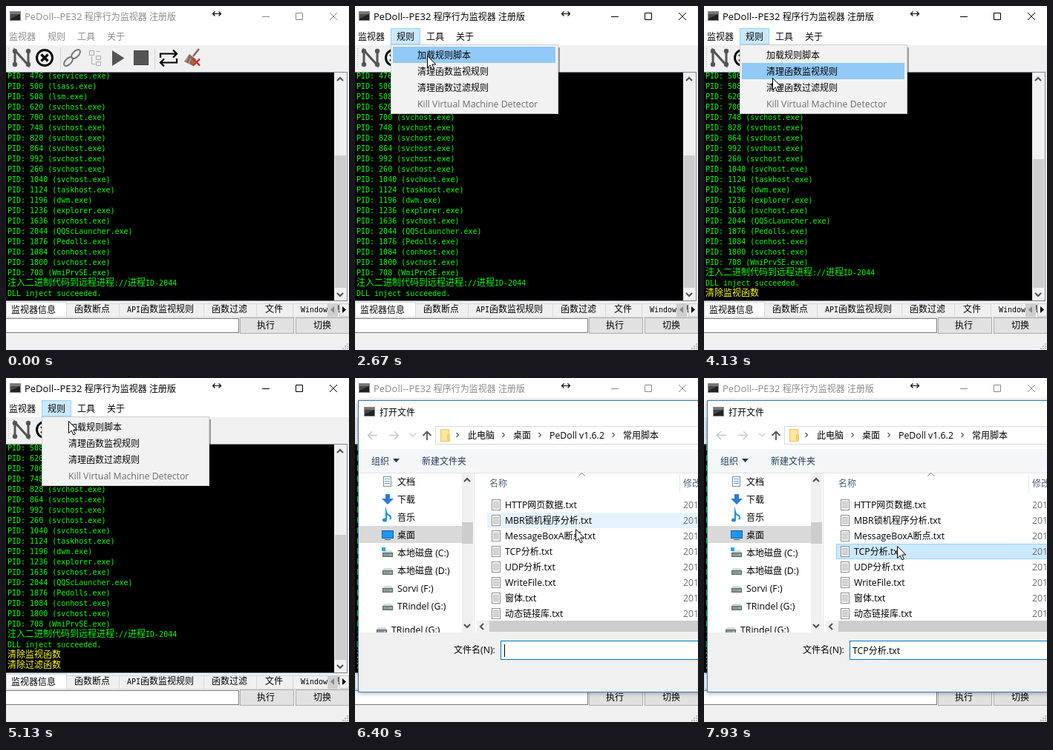
Animation of 462x465 px, one loop 8 s. Source, as an HTML page with a canvas:

```html
<!DOCTYPE html>
<html lang="zh">
<head>
<meta charset="utf-8">
<style>
html, body { margin: 0; width: 100%; height: 100%; overflow: hidden; background: #f0f0f0; }
canvas { display: block; }
</style>
</head>
<body>
<canvas id="stage" width="462" height="465"></canvas>
<script>
const view = document.getElementById('stage').getContext('2d');
const layer = Object.assign(document.createElement('canvas'), { width: 500, height: 465 }).getContext('2d');
let ctx = view;
const LOOP = 8000;
const CJK = '12px "Noto Sans CJK SC", "Noto Sans CJK", sans-serif';
const UI = '12.3px "Open Sans", "Noto Sans", sans-serif';
const TITLE = '13px "Open Sans", "Noto Sans", sans-serif';
const MONO = '10px "DejaVu Sans Mono", monospace';

// ---- timeline ----
const pointer = [
  [330, 347, 304], [1130, 68, 36], [1400, 68, 36], [1530, 72, 42], [1670, 72, 42],
  [1735, 89, 57], [1870, 89, 57], [2000, 97, 61], [2600, 97, 61], [2670, 97, 67],
  [2800, 96, 95], [3200, 96, 95], [3600, 70, 36], [3850, 70, 40], [4000, 87, 80],
  [4130, 92, 97], [4330, 94, 117], [4530, 94, 117], [4800, 68, 38], [5000, 72, 42],
  [5130, 84, 58], [5270, 90, 62], [5530, 90, 62], [5870, 114, 95], [6400, 297, 204],
  [6600, 290, 172], [6700, 290, 172], [6850, 280, 190], [7130, 270, 212],
  [7400, 270, 212], [7500, 266, 254], [7800, 266, 254], [7930, 260, 227]
];
const menuTimes = [[1400, 3200], [3800, 4530], [4930, 5530]];
const hoverTimes = [[1000, 1400], [3550, 3800], [4750, 4930]];
const itemSteps = [[1670, 0], [2735, 1], [3200, -1], [3930, 1], [4200, 2], [4530, -1], [5200, 0], [5530, -1]];
const pickSteps = [[6660, 0], [6860, 1], [7130, 2], [7470, 4], [7870, 3]];

const within = (spans, t) => spans.find(([a, b]) => t >= a && t < b);
const stepAt = (steps, t) => steps.reduce((v, [at, n]) => t >= at ? n : v, -1);
const clamp = v => Math.min(1, Math.max(0, v));

function pointerAt(t) {
  const i = pointer.findIndex(p => p[0] > t);
  if (i < 1) return i ? pointer[pointer.length - 1].slice(1) : null;
  const [a, x, y] = pointer[i - 1], [b, X, Y] = pointer[i];
  const k = (t - a) / (b - a);
  return [x + (X - x) * k, y + (Y - y) * k];
}

// ---- content ----
const processes = ('476 services,500 lsass,508 lsm,620 svchost,700 svchost,748 svchost,828 svchost,' +
  '864 svchost,992 svchost,260 svchost,1040 svchost,1124 taskhost,1196 dwm,1236 explorer,' +
  '1636 svchost,2044 QQScLauncher,1876 Pedolls,1084 conhost,1800 svchost,708 WmiPrvSE')
  .split(',').map(p => 'PID: ' + p.replace(' ', ' (') + '.exe)');
const log = [...processes, '注入二进制代码到远程进程://进程ID-2044', 'DLL inject succeeded.', '清除监视函数', '清除过滤函数'];
const menuItems = ['加载规则脚本', '清理函数监视规则', '清理函数过滤规则', 'Kill Virtual Machine Detector'];
const files = ['HTTP网页数据', 'MBR锁机程序分析', 'MessageBoxA断点', 'TCP分析', 'UDP分析', 'WriteFile', '窗体', '动态链接库']
  .map(n => n + '.txt');
const places = ['文档', '下载', '音乐', '桌面', '本地磁盘 (C:)', '本地磁盘 (D:)', 'Sorvi (F:)', 'TRindel (G:)'];

// ---- drawing helpers ----
function box(x, y, w, h, fill, edge) {
  ctx.fillStyle = edge || fill;
  ctx.fillRect(x, y, w, h);
  if (edge) {
    ctx.fillStyle = fill;
    ctx.fillRect(x + 1, y + 1, w - 2, h - 2);
  }
}
function fill(d, color) {
  ctx.fillStyle = color;
  ctx.fill(new Path2D(d));
}
function stroke(d, color, width = 1) {
  ctx.strokeStyle = color;
  ctx.lineWidth = width;
  ctx.stroke(new Path2D(d));
}
function oval(x, y, rx, ry, turn, color, width) {
  ctx.beginPath();
  ctx.ellipse(x, y, rx, ry, turn, 0, 7);
  ctx.strokeStyle = ctx.fillStyle = color;
  ctx.lineWidth = width;
  width ? ctx.stroke() : ctx.fill();
}
// Chinese and Latin runs have their own fonts.
function text(s, x, cy, color = '#000', latin = UI) {
  const base = cy + (latin === MONO ? 4 : 5);
  for (const run of s.match(/[\u2e80-\uffff]+|[^\u2e80-\uffff]+/g)) {
    ctx.font = run[0] > '\u2e80' ? CJK : latin;
    ctx.fillStyle = color;
    ctx.fillText(run, x, base);
    x += ctx.measureText(run).width;
  }
}
function chevron(x, y, dir, color = '#505050', width = 2) {
  const d = { up: 'm-4 2l4-4l4 4', down: 'm-4-2l4 4l4-4', left: 'm2-4l-4 4l4 4', right: 'm-1.5-3l3 3l-3 3' }[dir];
  stroke(`M${x} ${y}${d}`, color, width);
}
function consoleIcon(x, y) {
  box(x, y, 15, 13, '#222', '#888');
  box(x + 1, y + 1, 13, 3, '#777');
  fill(`M${x + 1} ${y + 4}h13l-13 6z`, '#484848');
}

// ---- main window ----
function toolbar() {
  box(0, 53, 462, 36, '#f0f0f0');
  for (const x of [73, 200]) box(x, 56, 1, 29, '#d4d4d4');
  for (let y = 57; y < 84; y += 3) box(3, y, 1, 1, '#aaa');
  stroke('M12 80V60L30 80V60', '#555', 3);
  for (const x of [12, 30]) for (const y of [61, 79]) oval(x, y, 3.2, 3.2, 0, '#555');
  oval(52, 70, 10.5, 10.5, 0, '#000', 2.8);
  stroke('M47.5 65.5l9 9m0-9l-9 9', '#000', 3.2);
  oval(94, 65, 7.5, 4, -.8, '#777', 2);
  oval(84, 75, 7.5, 4, -.8, '#777', 2);
  stroke('M112.5 60.5h6v6h-6zM121.5 61.5h5M115.5 68v10.500h5M121.5 67.5h6v5h-6zM121.5 75.5h6v5h-6z', '#aaa');
  fill('M143 60L159.500 70.500L143 81Z', '#555');
  box(172, 60, 20, 20, '#555', '#444');
  stroke('M208 70V64.500H230M225 59.500l5 5l-5 5M230 71v5.500H208M213 71.500l-5 5l5 5', '#000', 2.2);
  stroke('M260 58L252 68', '#7d6658', 2.5);
  fill('M247 65l9 7l-4 9l-12-6z', '#8c6b58');
  stroke('M245 69l-3 6m7-4l-3 7', '#c9b3a5');
  stroke('M252 71.500l9 9m0-9l-9 9', '#d8281c', 2.4);
}

function terminal(added) {
  box(0, 89, 460, 310, '#828790');
  box(0, 90, 442, 308, '#000');
  ctx.save();
  ctx.beginPath();
  ctx.rect(0, 90, 442, 308);
  ctx.clip();
  for (let i = 0; i < 22; i++) {
    const n = i + added;
    text(log[n], 2, 94 + 14 * i, n > 21 ? '#ff0' : '#0f0', MONO);
  }
  ctx.restore();
  box(442, 90, 17, 308, '#f0f0f0');
  const top = 202 + 5 * added;
  box(443, top, 15, 381 - top, '#cdcdcd');
  chevron(450, 99, 'up');
  chevron(450, 390, 'down');
}

function footer() {
  const edges = [81, 152, 266, 337, 386, 470];
  const names = [[92, '函数断点'], [163, 'API函数监视规则'], [277, '函数过滤'], [349, '文件'], [397, 'Window消息']];
  names.forEach(([x, name], i) => {
    box(edges[i], 402, edges[i + 1] - edges[i] + 1, 19, '#f0f0f0', '#d9d9d9');
    text(name, x, 410, '#000', MONO);
  });
  box(0, 400, 82, 21, '#fff', '#d9d9d9');
  text('监视器信息', 7, 411, '#000', MONO);
  box(433, 402, 14, 18, '#cfcfcf');
  box(449, 402, 13, 18, '#f0f0f0', '#d0d0d0');
  fill('M442 406v9l-5-4.500z', '#888');
  fill('M453 406v9l5-4.500z', '#000');
  box(-1, 422, 315, 20, '#fff', '#7a7a7a');
  box(315, 421, 73, 22, '#e1e1e1', '#adadad');
  box(390, 421, 73, 22, '#e1e1e1', '#adadad');
  text('执行', 338, 432, '#000', MONO);
  text('切换', 414, 432, '#000', MONO);
  for (let i = 0; i < 3; i++)
    for (let j = 0; j <= i; j++) box(459 - 3 * j, 456 + 3 * i, 2, 2, '#bbb');
}

function mainWindow(t) {
  const ink = t >= 1370 && t < 5700 ? '#000' : '#8a8a8a';
  const added = (t >= 3260) + (t >= 4600);
  const open = within(menuTimes, t);
  box(0, 0, 462, 465, '#f0f0f0');
  box(0, 0, 462, 53, '#fff');
  consoleIcon(5, 7);
  text('PeDoll--PE32 程序行为监视器 注册版', 25, 14, ink, TITLE);
  stroke('M279 10.5h10M281.500 7.500l-3 3l3 3M286.500 7.500l3 3l-3 3', '#000', 1.2);
  stroke('M345 14.5h10M390.500 9.500h9v9h-9zM436 9l10 10m0-10l-10 10', ink);
  if (open) box(48, 30, 40, 22, '#cce8ff', '#99d1ff');
  else if (within(hoverTimes, t)) box(48, 30, 40, 22, '#e5f3ff', '#cce8ff');
  [[4, '监视器'], [56, '规则'], [96, '工具'], [136, '关于']].forEach(([x, s]) => text(s, x, 41, ink));
  toolbar();
  terminal(added);
  footer();
  if (open) menu(clamp((t - open[0]) / 120), stepAt(itemSteps, t));
}

function menu(alpha, active) {
  ctx.save();
  ctx.globalAlpha = alpha;
  box(52, 56, 224, 92, 'rgba(0,0,0,.35)');
  box(48, 52, 226, 94, '#f2f2f2', '#ccc');
  if (active >= 0) box(51, 55 + 22 * active, 219, 22, '#91c9f7');
  menuItems.forEach((s, i) => text(s, 84, 66 + 22 * i, i < 3 ? '#000' : '#6d6d6d'));
  ctx.restore();
}

// ---- file dialog ----
function sheet() {
  ctx.save();
  ctx.shadowColor = 'rgba(0,0,0,.35)';
  ctx.shadowBlur = 6;
  ctx.shadowOffsetY = 1;
  box(4, 30, 860, 395, '#3a7cc4');
  ctx.restore();
  box(5, 31, 860, 393, '#fff');
  consoleIcon(12, 39);
  text('打开文件', 33, 46);
}

function blankPanes() {
  box(144, 129, 15, 214, '#dcdcdc');
  box(144, 195, 15, 29, '#969696');
  chevron(151, 138, 'up', '#000');
  chevron(151, 335, 'down', '#000');
  box(181, 327, 600, 25, '#cdcdcd');
  box(181, 327, 600, 15, '#9b9b9b');
  box(135, 359, 56, 21, '#e1e1e1');
}

function placeIcon(i, x, y) {
  if (i === 0) {
    box(x + 2, y - 7, 11, 14, '#fff', '#7d8a96');
    stroke(`M${x + 4} ${y - 3.5}h7m-7 3h7m-7 3h7`, '#5b9bd5');
  } else if (i === 1) fill(`M${x + 5} ${y - 7}h6v6h5l-8 8l-8-8h5z`, '#2b7cd3');
  else if (i === 2) {
    stroke(`M${x + 6} ${y + 4}v-11q1 4 5 5q2 3 0 5`, '#1e90e0', 2);
    oval(x + 4, y + 4, 3, 2.5, 0, '#1e90e0');
  } else if (i === 3) {
    box(x, y - 6, 16, 11, '#1e96f0', '#0b5ea8');
    box(x + 4, y + 6, 8, 1, '#456');
  } else {
    box(x + 1, y, 14, 6, '#8d9499', '#5d6468');
    fill(`M${x + 3} ${y - 3}h10l2 3h-14z`, '#d5d9dc');
    box(x + 11, y + 2, 2, 2, '#6f6');
    if (i === 4) box(x, y - 7, 5, 5, '#28a8ea');
  }
}

function navigation() {
  const pale = '#c8c8c8';
  stroke('M30 77.500H18M23 72l-5.500 5.500l5.500 5.500M46 77.500H58M53 72l5.500 5.500l-5.500 5.500', pale, 1.5);
  chevron(78, 77, 'down', pale, 1.2);
  stroke('M97 84V73M91.500 78l5.500-5.500l5.500 5.500', '#555', 1.8);
  box(108, 65, 500, 25, '#fff', '#d9d9d9');
  box(115, 69, 12, 17, '#ffe79b', '#e8c560');
  box(124, 76, 4, 10, '#f3cf6b');
  [[152, '此电脑'], [213, '桌面'], [262, 'PeDoll v1.6.2'], [361, '常用脚本']].forEach(([x, s]) => text(s, x, 77));
  for (const x of [138, 200, 249, 348]) chevron(x, 77, 'right', '#555', 1.2);
  box(5, 96, 500, 32, '#f5f6f7');
  box(5, 128, 500, 1, '#e5e5e5');
  text('组织', 22, 112, '#1e395b');
  fill('M51 109h9l-4.500 5z', '#1e395b');
  text('新建文件夹', 90, 112, '#1e395b');
}

function placeList() {
  box(5, 200, 139, 23, '#d9d9d9');
  places.forEach((s, i) => {
    const y = 140 + 24 * i;
    placeIcon(i, 36, y);
    text(s, 57, y);
  });
  ctx.save();
  ctx.beginPath();
  ctx.rect(5, 129, 139, 215);
  ctx.clip();
  placeIcon(7, 28, 340);
  text(places[7], 49, 340);
  ctx.restore();
  box(144, 129, 15, 215, '#f0f0f0');
  box(144, 195, 15, 29, '#cdcdcd');
  chevron(151, 138, 'up');
  chevron(151, 335, 'down');
  box(160, 129, 1, 215, '#e5e5e5');
}

function fileList(picked, hover) {
  stroke('M301 132.500l4.500-4l4.500 4', '#777');
  text('名称', 181, 142, '#4c607a');
  text('修改日期', 442, 142, '#4c607a');
  box(437, 130, 1, 25, '#e5e5e5');
  files.forEach((name, i) => {
    const y = 161 + 21 * i, cy = y + 10;
    if (i === picked) box(178, y, 330, 21, '#cce8ff', '#99d1ff');
    else if (i === hover) box(178, y, 330, 21, '#e5f3ff');
    box(184, cy - 7, 12, 15, '#fff', '#8c8c8c');
    stroke(`M186 ${cy - 3.5}h8m-8 2h8m-8 2h8m-8 2h8m-8 2h8`, '#a8a8a8');
    text(name, 202, cy);
    text('2017', 442, cy, '#6d6d6d');
  });
  box(164, 328, 340, 16, '#f0f0f0');
  box(181, 328, 340, 15, '#cdcdcd');
  chevron(171, 336, 'left');
}

function dialogBody(t) {
  const picked = stepAt(pickSteps, t);
  const [x, y] = pointerAt(t - 70);
  navigation();
  placeList();
  fileList(picked, x >= 178 ? Math.floor((y - 161) / 21) : -1);
  box(5, 344, 500, 80, '#f0f0f0');
  text('文件名(N):', 133, 367);
  box(196, 355, 330, 26, '#fff', '#0078d7');
  if (picked < 0) box(201, 360, 1, 17, '#000');
  else text(files[picked], 200, 368);
}

// The dialog is composed on its own layer so that it fades as one piece.
function dialog(t) {
  const grow = clamp((t - 5800) / 180);
  const size = .96 + .04 * grow;
  ctx = layer;
  ctx.clearRect(0, 0, 500, 465);
  sheet();
  if (t < 6000) blankPanes();
  else dialogBody(t);
  ctx = view;
  ctx.save();
  ctx.globalAlpha = grow;
  ctx.translate(432 * (1 - size), 227 * (1 - size));
  ctx.scale(size, size);
  ctx.drawImage(layer.canvas, 0, 0);
  ctx.restore();
}

function arrow([x, y]) {
  ctx.save();
  ctx.translate(Math.round(x) + .5, Math.round(y) + .5);
  const shape = 'M0 0V16L3.700 12.500L6.300 18.300L8.800 17.200L6.300 11.500H11.300Z';
  fill(shape, '#fff');
  stroke(shape, '#000');
  ctx.restore();
}

function frame(now) {
  const t = now % LOOP;
  mainWindow(t);
  if (t >= 5800) dialog(t);
  const tip = pointerAt(t);
  if (tip) arrow(tip);
  requestAnimationFrame(frame);
}
requestAnimationFrame(frame);
</script>
</body>
</html>
```
